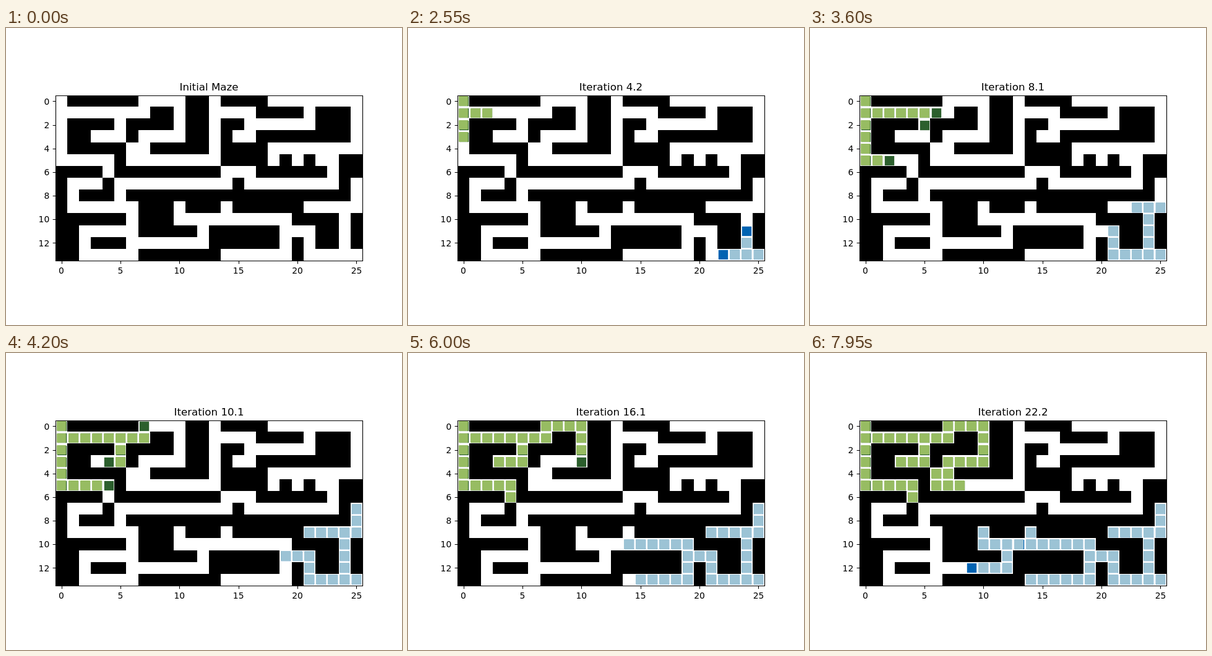
Animation, 640 px wide and 480 px high, one loop 8000 ms. Source, as an HTML page:

```html
<!DOCTYPE html>
<html lang="en">
<head>
<meta charset="utf-8">
<title>Maze search</title>
<style>
  html, body { margin: 0; width: 100%; height: 100%; overflow: hidden; background: #fff; }
  svg { display: block; width: 640px; height: 480px; }
  text { font-family: "DejaVu Sans", Verdana, sans-serif; font-size: 13.889px; }
  #title { font-size: 16.667px; text-anchor: middle; }
</style>
</head>
<body>
<svg id="stage" viewBox="0 0 640 480"></svg>
<script>
const MAZE = [
  ".######....##.####........",
  "........##.##....####.###.",
  ".####.####.##.##......###.",
  ".##...#....##.#..########.",
  ".#####..#####.####........",
  ".....#........####.#.#..##",
  "####.#########...######.##",
  "#...#..........#........#.",
  "#.###.###################.",
  "#......###.###.######.....",
  "######.###..........####.#",
  "##.....#####.######...##.#",
  "##.###.......######.#.##.#",
  "##.....#######......#....."
];
const ROWS = MAZE.length, COLS = MAZE[0].length;
const LOOP = 8000, INTRO = 1500, STEP = 150;
const LAST = Math.floor((LOOP - INTRO - 1) / STEP);

const LEFT = 80, RIGHT = 576, TOP = 108.86, BOTTOM = 375.94;
const CELL = (RIGHT - LEFT) / COLS;
const centerX = c => LEFT + CELL * (c + 0.5);
const centerY = r => TOP + CELL * (r + 0.5);
const snap = v => Math.round(v) + 0.5;

const svg = document.getElementById("stage");

function add(tag, attrs, parent = svg) {
  const el = document.createElementNS("http://www.w3.org/2000/svg", tag);
  for (const name in attrs) el.setAttribute(name, attrs[name]);
  parent.appendChild(el);
  return el;
}

function label(x, y, content, anchor) {
  add("text", { x, y, "text-anchor": anchor }).textContent = content;
}

function drawWalls() {
  const colEdge = c => Math.round(LEFT + CELL * c);
  const rowEdge = r => Math.max(109, Math.round(108 + 268 / ROWS * r));
  let d = "";
  MAZE.forEach((row, r) => {
    for (const run of row.matchAll(/#+/g)) {
      const x0 = colEdge(run.index), x1 = colEdge(run.index + run[0].length);
      d += `M${x0} ${rowEdge(r)}H${x1}V${rowEdge(r + 1)}H${x0}Z`;
    }
  });
  add("path", { d, "shape-rendering": "crispEdges" });
}

function drawAxes() {
  const x0 = snap(LEFT), x1 = snap(RIGHT), y0 = snap(TOP), y1 = snap(BOTTOM);
  let d = `M${x0} ${y0}H${x1}V${y1}H${x0}Z`;
  for (let c = 0; c < COLS; c += 5) {
    d += `M${snap(centerX(c))} ${y1}v4.86`;
    label(centerX(c), 397, c, "middle");
  }
  for (let r = 0; r < ROWS; r += 2) {
    d += `M${x0} ${snap(centerY(r))}h-4.86`;
    label(70.28, Math.round(centerY(r) + 5.2), r, "end");
  }
  add("path", { d, fill: "none", stroke: "#000", "stroke-width": 1.11 });
}

// Breadth-first distances from a start cell
function search(startRow, startCol) {
  const queue = [{ r: startRow, c: startCol, dist: 0 }];
  const seen = new Set([startRow * COLS + startCol]);
  for (const { r, c, dist } of queue) {
    for (const [dr, dc] of [[0, 1], [1, 0], [0, -1], [-1, 0]]) {
      const nr = r + dr, nc = c + dc, key = nr * COLS + nc;
      if (MAZE[nr]?.[nc] !== "." || seen.has(key)) continue;
      seen.add(key);
      queue.push({ r: nr, c: nc, dist: dist + 1 });
    }
  }
  return queue;
}

const marks = [];

function addMark(from, attrs) {
  marks.push({ from, el: add("rect", { ...attrs, visibility: "hidden" }) });
}

// Each cell turns dark on its side's turn and light one step later
function addSearch(startRow, startCol, turn, dark, light) {
  for (const { r, c, dist } of search(startRow, startCol)) {
    const from = 2 * dist + turn;
    if (from > LAST) break;
    const cx = centerX(c), cy = centerY(r);
    addMark(from, {
      x: Math.round(cx) - 7.19, y: Math.round(cy) - 7.19,
      width: 15.38, height: 15.38, fill: dark
    });
    const x = Math.round(cx - 6.944), y = Math.round(cy - 6.944);
    addMark(from + 1, {
      x, y,
      width: Math.round(cx + 6.944) - x, height: Math.round(cy + 6.944) - y,
      fill: light, stroke: light, "stroke-width": 2.083, "stroke-linejoin": "round"
    });
  }
}

drawWalls();
addSearch(0, 0, 0, "#2c5f2d", "#97bc62");
addSearch(ROWS - 1, COLS - 1, 1, "#0063b2", "#9cc3d5");
drawAxes();
const title = add("text", { id: "title", x: (LEFT + RIGHT) / 2, y: 101 });

let shown = null;

function render(time) {
  const step = Math.floor((time % LOOP - INTRO) / STEP);
  if (step === shown) return;
  shown = step;
  title.textContent = step < 0
    ? "Initial Maze"
    : `Iteration ${Math.floor(step / 2) + 1}.${step % 2 + 1}`;
  for (const { from, el } of marks) {
    el.setAttribute("visibility", step >= from ? "visible" : "hidden");
  }
}

const start = performance.now();
function tick() {
  render(performance.now() - start);
  requestAnimationFrame(tick);
}
tick();
</script>
</body>
</html>
```
